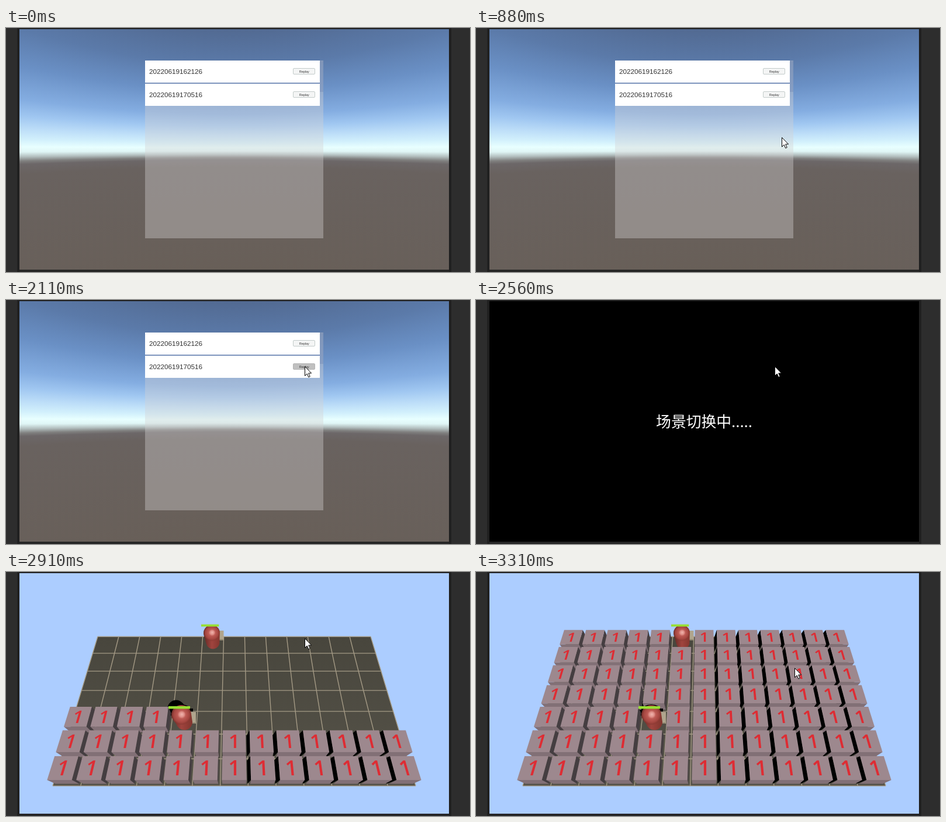
Recreate the animation shown at these times as an HTML page with a canvas. Size 794 by 420 pixels, loop 8000 ms.

```html
<!DOCTYPE html>
<html lang="zh">
<head>
<meta charset="utf-8">
<title>Replay</title>
<style>
html, body { margin: 0; width: 100%; height: 100%; overflow: hidden; background: #2d2d2d; }
canvas { display: block; }
</style>
</head>
<body>
<canvas id="stage" width="794" height="420"></canvas>
<script>
const LOOP = 8000;
const VIEW = { x: 23, y: 2, w: 735, h: 414 };
const CENTER = 390.5;
const COLS = 13, ROWS = 7;
const canvas = document.getElementById('stage');
const ctx = canvas.getContext('2d');

const clamp = (v, lo, hi) => Math.min(hi, Math.max(lo, v));
const mix = (a, b, u) => a + (b - a) * u;

function rect(x, y, w, h, fill) {
  ctx.fillStyle = fill;
  ctx.fillRect(x, y, w, h);
}

function polygon(points, fill) {
  ctx.beginPath();
  points.forEach(p => ctx.lineTo(...p));
  ctx.closePath();
  ctx.fillStyle = fill;
  ctx.fill();
}

function text(string, x, y, font, fill, align = 'left') {
  ctx.font = font;
  ctx.fillStyle = fill;
  ctx.textAlign = align;
  ctx.fillText(string, x, y);
}

// ---- Menu over a sky whose bands follow lines of equal elevation ----

// Offset from the horizon in the middle column, colour
const SKY = [
  [-207, '#526a92'], [-145, '#5b7aa9'], [-100, '#6a90c5'], [-60, '#84ade1'],
  [-40, '#a0c7f1'], [-25, '#bcddf8'], [-12, '#d2f0fc'], [-3, '#e8ffff'],
  [3, '#e0f6f6'], [9, '#b2bebe'], [14, '#80807f'], [18, '#6c6768'],
  [30, '#69625f'], [207, '#685f58']
];

function paintSky() {
  const layer = document.createElement('canvas');
  layer.width = 794;
  layer.height = 420;
  const c = layer.getContext('2d');
  for (let x = VIEW.x; x < VIEW.x + VIEW.w; x++) {
    const reach = 207 * Math.hypot(1, (x - CENTER) / 358.5);
    const g = c.createLinearGradient(0, 209 - reach, 0, 209 + reach);
    SKY.forEach(([offset, color]) => g.addColorStop((offset + 207) / 414, color));
    c.fillStyle = g;
    c.fillRect(x, VIEW.y, 1, VIEW.h);
  }
  return layer;
}
const sky = paintSky();

function listRow(y, label, pressed) {
  rect(238, y, 299, 38, '#fff');
  text(label, 245, y + 23, '11.7px "Liberation Sans", Arial, sans-serif', '#323232');
  ctx.beginPath();
  ctx.roundRect(491.5, y + 13.5, 37, 10, 1.5);
  ctx.fillStyle = pressed ? '#c0c0c0' : '#f4f5f5';
  ctx.fill();
  ctx.strokeStyle = pressed ? '#b4b4b4' : '#c3cbca';
  ctx.lineWidth = 1;
  ctx.stroke();
  text('Replay', 510.3, y + 20.6, '5.5px "Liberation Sans", Arial, sans-serif', '#323232', 'center');
}

function drawMenu(t) {
  ctx.drawImage(sky, 0, 0);
  rect(238, 56, 305, 306, 'rgba(210,208,208,.39)');
  rect(537, 57, 6, 53, 'rgba(110,135,180,.4)');
  rect(238, 94, 299, 2, '#7c94bd');
  listRow(56, '20220619162126', false);
  listRow(96, '20220619170516', t >= 2028);
}

function drawLoading() {
  rect(VIEW.x, VIEW.y, VIEW.w, VIEW.h, '#000');
  text('场景切换中.....', CENTER, 219, '25.8px "Noto Sans CJK SC", "Noto Sans CJK", sans-serif', '#fff', 'center');
}

// ---- Board seen by a camera tilted 60 degrees ----

// x: cells from the middle, h: height, j: rows from the front edge
function project(x, h, j) {
  const scale = 47.77 / (1 + 0.0471 * j - 0.0816 * h);
  return [CENTER + x * scale, -668 + (21.69 - 2 * h) * scale];
}

const BOX_H = 0.55, HALF = 0.425;
const players = [
  { col: 5, row: 6, head: [352, 105], foot: [354, 121], size: 0.82 },
  { col: 4, row: 2, head: [300, 246], foot: [305, 258], size: 1 }
];

function drawGround() {
  const half = COLS / 2;
  const g = ctx.createLinearGradient(0, 111, 0, 368);
  g.addColorStop(0, '#48463d');
  g.addColorStop(1, '#565349');
  polygon([project(-half, 0, ROWS), project(half, 0, ROWS), project(half, 0, 0), project(-half, 0, 0)], g);
  ctx.beginPath();
  for (let i = 0; i <= COLS; i++) {
    ctx.moveTo(...project(i - half, 0, 0));
    ctx.lineTo(...project(i - half, 0, ROWS));
  }
  for (let j = 0; j <= ROWS; j++) {
    ctx.moveTo(...project(-half, 0, j));
    ctx.lineTo(...project(half, 0, j));
  }
  ctx.strokeStyle = '#a49a85';
  ctx.lineWidth = 1.4;
  ctx.stroke();
}

function drawBox(col, row) {
  const x = col - 6, left = x - HALF, right = x + HALF;
  const near = row + 0.5 - HALF, far = row + 0.5 + HALF;
  const side = (edge, base, fill) => polygon([
    project(edge, BOX_H, near), project(edge, BOX_H, far), project(base, 0, far), project(base, 0, near)
  ], fill);
  if (x < 0) side(right, right, '#453e41');
  if (x > 0) side(left, left - 0.1, '#000');
  polygon([
    project(left, BOX_H, near), project(right, BOX_H, near), project(right, 0, near), project(left, 0, near)
  ], '#827076');
  polygon([
    project(left, BOX_H, near), project(right, BOX_H, near), project(right, BOX_H, far), project(left, BOX_H, far)
  ], '#9d888e');
  drawDigit(x, row);
}

function drawDigit(x, row) {
  const origin = project(x, BOX_H, row + 0.5);
  const span = (a, b) => [(b[0] - a[0]) / 100, (b[1] - a[1]) / 100];
  const across = span(project(x - 0.5, BOX_H, row + 0.5), project(x + 0.5, BOX_H, row + 0.5));
  const down = span(project(x, BOX_H, row + 1), project(x, BOX_H, row));
  ctx.save();
  ctx.transform(...across, ...down, ...origin);
  text('1', 0, 27, '600 74px "Open Sans", sans-serif', '#de2c33', 'center');
  ctx.restore();
}

function drawShadow({ head, foot, size }) {
  ctx.save();
  ctx.beginPath();
  ctx.rect(VIEW.x, 111, VIEW.w, 300);
  ctx.clip();
  ctx.beginPath();
  ctx.moveTo(foot[0], foot[1] - 8 * size);
  ctx.lineTo(head[0] - 9 * size, head[1] - 11 * size);
  ctx.lineWidth = 29 * size;
  ctx.lineCap = 'round';
  ctx.strokeStyle = '#000';
  ctx.stroke();
  ctx.restore();
}

function drawPlayer({ head: [hx, hy], foot: [fx, fy], size, row }) {
  if (row < ROWS - 1) {
    ctx.beginPath();
    ctx.ellipse(hx, hy - 9, 16, 9, 0, 0, 7);
    ctx.fillStyle = '#000';
    ctx.fill();
    rect(hx + 8, hy - 11, 12, 5, '#000');
  }
  rect(hx + 12 * size, hy - 5 * size, 13 * size, 20 * size, '#b0a58d');
  rect(hx + 12 * size, hy + 13 * size, 12 * size, 2, '#8f866f');

  const r = 17 * size, base = 14 * size;
  const body = ctx.createLinearGradient(hx - r, 0, hx + r, 0);
  body.addColorStop(0, '#5f2824');
  body.addColorStop(0.5, '#a0443e');
  body.addColorStop(1, '#84362f');
  ctx.beginPath();
  ctx.arc(hx, hy, r, Math.PI * 0.92, Math.PI * 1.95);
  ctx.arc(fx, fy, base, 0, Math.PI * 0.9);
  ctx.closePath();
  ctx.fillStyle = body;
  ctx.fill();

  const shine = ctx.createRadialGradient(hx + 1, hy - 1, 0, hx, hy, r);
  shine.addColorStop(0, '#f0b5ae');
  shine.addColorStop(0.25, '#df8f88');
  shine.addColorStop(0.42, '#bd5a54');
  shine.addColorStop(0.8, '#a3453f');
  shine.addColorStop(1, 'rgba(130,52,46,.4)');
  ctx.beginPath();
  ctx.arc(hx, hy, r, 0, 7);
  ctx.fillStyle = shine;
  ctx.fill();
  rect(hx - 22 * size, hy - 15 * size - (size < 1 ? 2.5 : 0), 37 * size, 4.5 * size, '#98df32');
}

function drawBoard(t) {
  rect(VIEW.x, VIEW.y, VIEW.w, VIEW.h, '#accdff');
  drawGround();
  players.forEach(drawShadow);
  const step = clamp(Math.floor((t - 2760) / 68), 0, 7);
  const filled = 6 + Math.round(step * 12.25);
  const outerFirst = [...Array(COLS).keys()].sort((a, b) => Math.abs(b - 6) - Math.abs(a - 6));
  for (let row = ROWS - 1; row >= 0; row--) {
    const player = players.find(p => p.row === row);
    for (const col of outerFirst) {
      const free = !player || player.col !== col;
      if (free && row * COLS + col < filled) drawBox(col, row);
    }
    if (player) drawPlayer(player);
  }
}

// ---- Pointer ----

const moves = [
  { start: 200, end: 550, steps: 6, ease: u => 1 - (1 - u) ** 1.6, path: [[722, 379], [527, 205]] },
  { start: 880, end: 1570, steps: 10, path: [[523, 188], [535, 162], [528, 126], [511, 108], [521, 98]] },
  { start: 1700, end: 2110, steps: 6, path: [[520, 99], [511, 114]] },
  { start: 3170, end: 3310, steps: 3, path: [[511, 114], [545, 165]] }
];

function pointerAt(t) {
  const move = moves.findLast(m => t >= m.start);
  if (!move) return null;
  const { start, end, steps, path, ease = u => u } = move;
  const last = steps - 1;
  const step = Math.floor(clamp((t - start) / (end - start), 0, 1) * last + 0.02);
  const place = ease(step / last) * (path.length - 1);
  const i = Math.min(Math.floor(place), path.length - 2);
  return [0, 1].map(axis => mix(path[i][axis], path[i + 1][axis], place - i));
}

const arrow = new Path2D('M.5 .5V16.5L4.2 13 6.7 18.8 9.2 17.7 6.7 12H11.6Z');

function drawPointer(t) {
  const at = pointerAt(t);
  if (!at) return;
  ctx.save();
  ctx.translate(...at);
  ctx.fillStyle = '#fff';
  ctx.strokeStyle = '#000';
  ctx.lineWidth = 1;
  ctx.fill(arrow);
  ctx.stroke(arrow);
  ctx.restore();
}

function draw(t) {
  rect(0, 0, 794, 420, '#2d2d2d');
  rect(19, 0, 743, 420, '#202020');
  rect(VIEW.x, 416, VIEW.w, 4, '#262626');
  if (t < 2560) drawMenu(t);
  else if (t < 2760) drawLoading();
  else drawBoard(t);
  drawPointer(t);
}

const began = performance.now();
function tick() {
  draw((performance.now() - began) % LOOP);
  requestAnimationFrame(tick);
}
tick();
</script>
</body>
</html>
```
